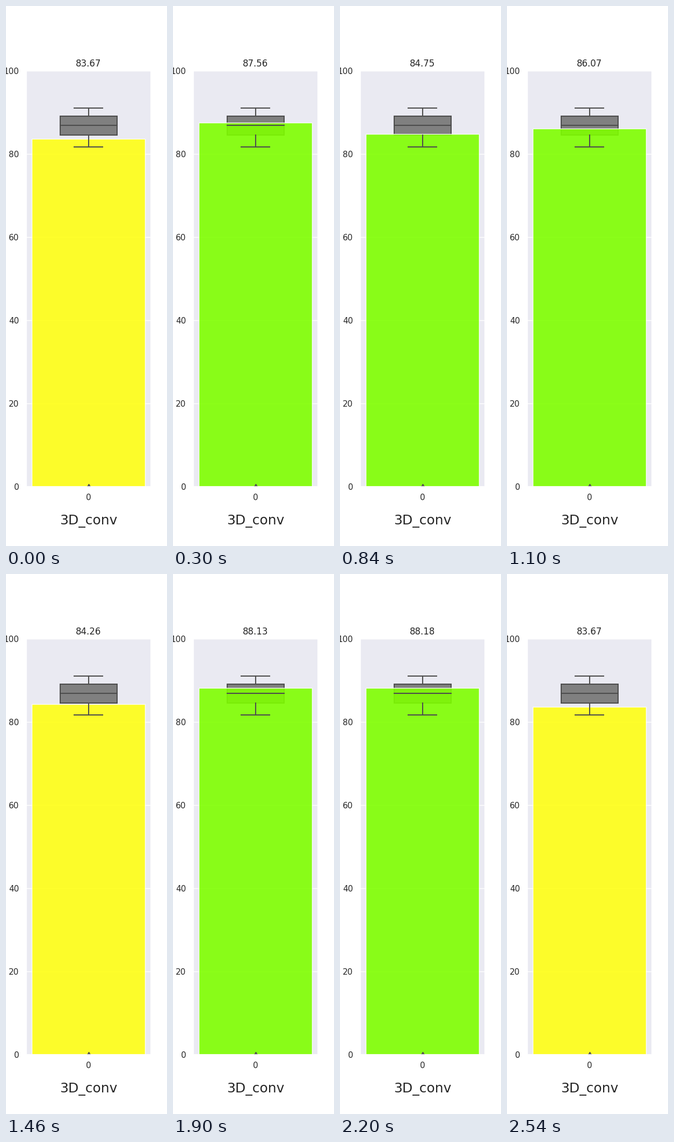
A matplotlib script for the animation above (2.56 s loop, 300 by 1000 pixels).

```python
import numpy as np
import matplotlib.pyplot as plt
from matplotlib.animation import FuncAnimation
from matplotlib.patches import Rectangle

FRAMES, INTERVAL = 128, 20
INK, LINE = "#262626", "#4d4d4d"
LOW, Q1, MEDIAN, Q3, HIGH = 81.69, 84.55, 86.9, 89.1, 91.05

# Score over time as (frame, value)
KEYS = np.array([
    (0, 83.67), (7, 85.9), (15, 87.56), (25, 83.1), (29, 83.1),
    (31, 82.51), (43, 85.2), (55, 86.07), (67, 84.9), (81, 83.4),
    (85, 83.4), (95, 88.13), (102, 88.6), (109, 88.18), (127, 83.67),
])

plt.rcParams.update({
    "font.family": "DejaVu Sans",
    "text.color": INK,
    "axes.edgecolor": "white",
    "axes.linewidth": 1.25,
})

fig = plt.figure(figsize=(3, 10), dpi=100, facecolor="white")
ax = fig.add_axes([0.125, 0.11, 0.775, 0.77], facecolor="#eaeaf2")
ax.set(xlim=(-0.44, 0.44), ylim=(0, 100), xticks=[0], yticks=range(0, 101, 20))
ax.set_axisbelow(True)
ax.grid(axis="y", color="white", linewidth=1)
ax.tick_params(length=0, pad=9.5, labelsize=11, labelcolor=INK)
fig.text(0.5125, 0.040, "3D_conv", size=18, ha="center", va="baseline")
title = ax.set_title("", size=12, pad=6)


def stroke(xs, ys):
    ax.plot(xs, ys, color=LINE, lw=1.5, zorder=2, scalex=False, scaley=False)


# Box plot: the box lies below the bar, its lines above
ax.add_patch(Rectangle((-0.2, Q1), 0.4, Q3 - Q1, facecolor="#808080",
                       edgecolor=LINE, lw=1.5, zorder=1))
for inner, outer in ((Q1, LOW), (Q3, HIGH)):
    stroke([0, 0], [inner, outer])
    stroke([-0.1, 0.1], [outer, outer])
stroke([-0.2, 0.2], [MEDIAN, MEDIAN])
ax.plot([0], [0], marker="d", ms=5, color=LINE, zorder=2,
        scalex=False, scaley=False)

bar = ax.add_patch(Rectangle((-0.4, 0), 0.8, 0, edgecolor="white", lw=1,
                             alpha=0.9, zorder=1))


def score(frame):
    """The reading refreshes on every second frame."""
    tick = frame if frame % 2 else max(frame - 1, 0)
    return np.interp(tick, KEYS[:, 0], KEYS[:, 1])


def update(frame):
    value = score(frame)
    bar.set_height(value)
    bar.set_facecolor("#ffff14" if value < Q1 else "#7fff00")
    title.set_text(f"{value:.2f}")
    return bar, title


anim = FuncAnimation(fig, update, frames=FRAMES, interval=INTERVAL,
                     repeat=True, repeat_delay=0, blit=False)
plt.show()
```
